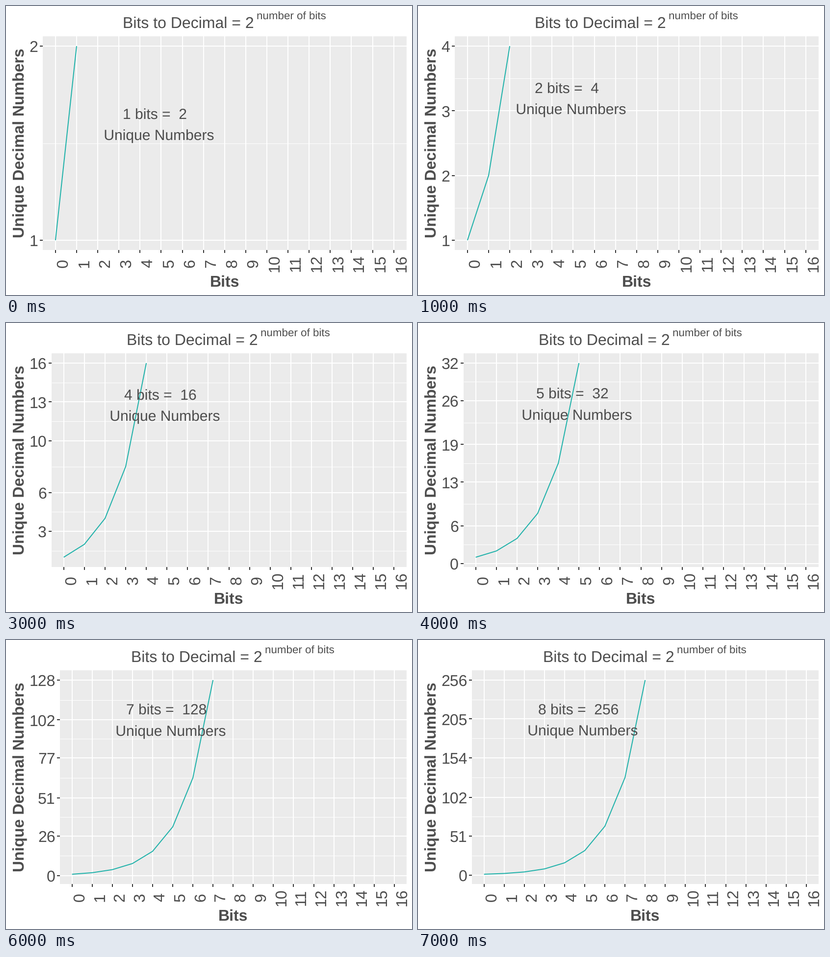
These frames come from a looping animation (828x591 px, 8 s). A matplotlib script:

```python
import numpy as np
import matplotlib.pyplot as plt
from matplotlib.animation import FuncAnimation
from matplotlib.patches import Rectangle

W, H, DPI = 828, 591, 64
PT = 72 / DPI                      # points per pixel
TOP, BOTTOM, RIGHT = 62, 499, 816.5
Y_LOW, Y_HIGH = 479, 82            # pixel rows of the smallest and largest value
GREY, TICK, PANEL, TEAL = "#4D4D4D", "#333333", "#EBEBEB", "#20B2AA"
MAX_BITS = 16

plt.rcParams.update({
    "font.family": "Liberation Sans",
    "text.hinting": "none",
    "toolbar": "None",
})

fig = plt.figure(figsize=(W / DPI, H / DPI), dpi=DPI, facecolor="white")
ax = fig.add_axes([0, 0, 1, 1])


def label(x, y, text, size=32, ha="center", **kw):
    ax.text(x, y, text, fontsize=size * PT, color=GREY, ha=ha, va="baseline",
            rotation_mode="anchor", zorder=5, **kw)


def line(xs, ys, color="white", width=2, z=2, **kw):
    ax.plot(xs, ys, color=color, lw=width * PT, zorder=z,
            solid_capstyle="butt", solid_joinstyle="round", **kw)


def draw(frame):
    bits = frame + 1
    top = 2 ** bits
    left = 75 + 17.5 * (len(str(top)) - 1)
    mid = (left + RIGHT) / 2
    step = (RIGHT - left) / (MAX_BITS + 1.2)

    def px(b):
        return left + step * (b + 0.6)

    def py(v):
        return Y_LOW + (Y_HIGH - Y_LOW) * (v - 1) / (top - 1)

    def visible(values):
        return [v for v in values if TOP <= py(v) <= BOTTOM]

    ax.clear()
    ax.set(xlim=(0, W), ylim=(H, 0))
    ax.axis("off")
    ax.add_patch(Rectangle((left, TOP), RIGHT - left, BOTTOM - TOP,
                           fc=PANEL, ec="none", zorder=0))

    # Horizontal grid and value axis
    breaks = np.unique(np.round(np.linspace(0, top, 6)).astype(int))
    for v in visible((breaks[1:] + breaks[:-1]) / 2):
        line([left, RIGHT], [py(v)] * 2, width=1, z=1)
    for v in visible(breaks):
        y = py(v)
        line([left, RIGHT], [y, y])
        line([left - 6, left], [y, y], TICK)
        label(left - 9.5, y + 12, str(v), ha="right")

    # Vertical grid and bit axis
    for b in range(MAX_BITS + 1):
        x = px(b)
        line([x, x], [TOP, BOTTOM])
        line([x, x], [BOTTOM, BOTTOM + 5.5], TICK)
        label(x + 24.5, 526, str(b), rotation=90)

    # Growth curve
    known = np.arange(bits + 1)
    line(px(known), py(2.0 ** known), TEAL, z=3)

    # Note inside the panel
    note_x, note_y = px(4.79), py(0.8 * top)
    label(note_x, note_y - 9, f"{bits} bits =  {top} ", 30)
    label(note_x, note_y + 33.4, " Unique Numbers", 30)

    # Titles
    label(mid - 208, 45, "Bits to Decimal = 2", ha="left")
    label(mid + 64.8, 28, "number of bits", 22.4, ha="left")
    label(mid, 574, "Bits", weight="bold")
    label(36, 280.5, "Unique Decimal Numbers", weight="bold", rotation=90)
    return []


anim = FuncAnimation(fig, draw, frames=8, init_func=lambda: [],
                     interval=1000, repeat=True, repeat_delay=0)
plt.show()
```
